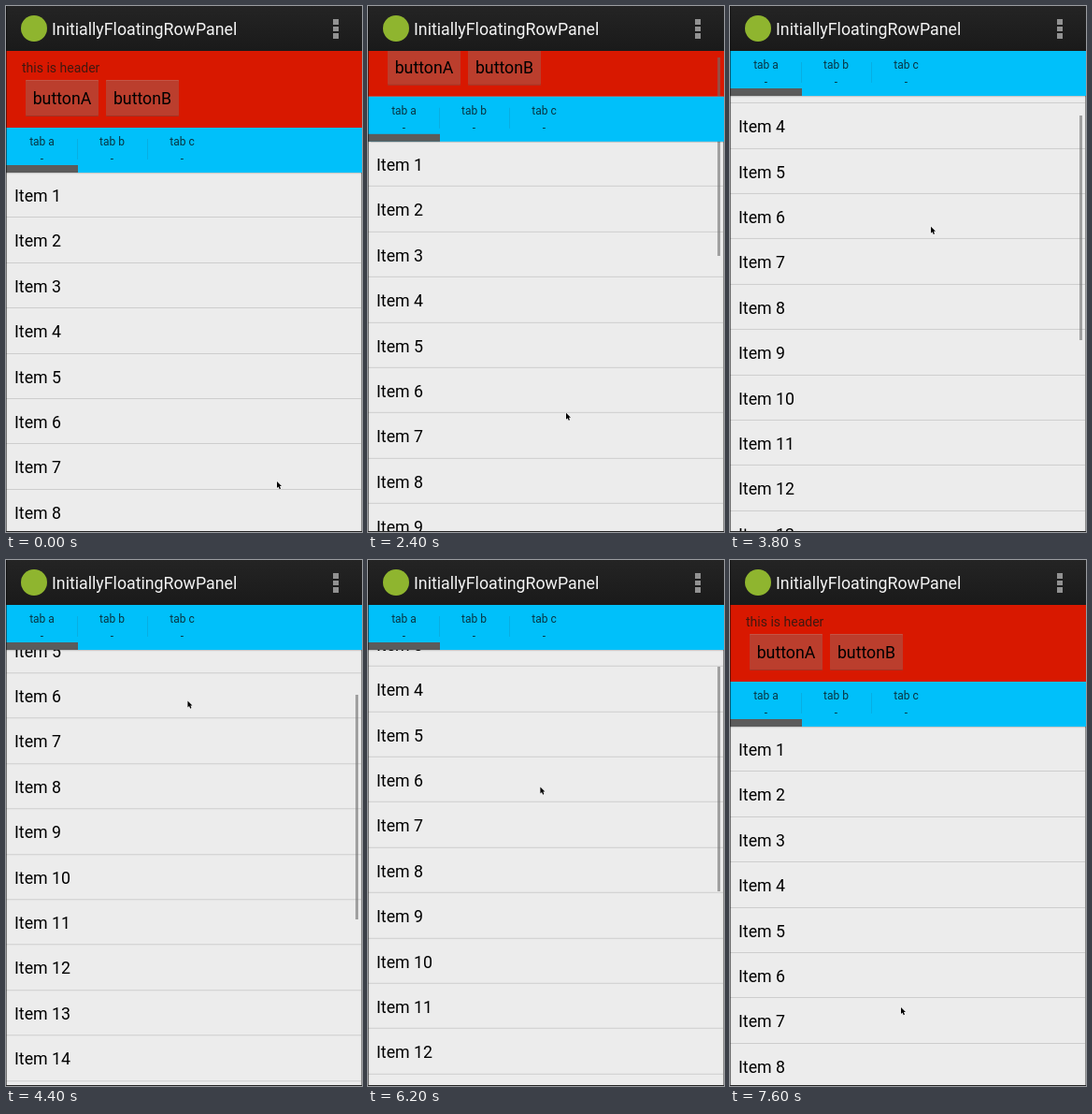
Recreate the animation shown at these times as an HTML page. Size 381x562 px, loop 7.8 s.

```html
<!DOCTYPE html>
<html lang="en">
<head>
<meta charset="utf-8">
<title>Sticky list</title>
<style>
html, body { margin: 0; width: 100%; height: 100%; overflow: hidden; }
#stage {
  position: relative; width: 381px; height: 562px; overflow: hidden;
  background: #ececec; color: #000; font: 17.75px Roboto, sans-serif;
}
#stage div, #stage svg { position: absolute; white-space: nowrap; }
#list { left: 0; top: 178px; width: 381px; }
.item {
  left: 0; width: 381px; height: 48.4px; line-height: 50px;
  text-indent: 9px; box-sizing: border-box; border-bottom: 1px solid #cdcdcd;
}
#right { left: 380px; top: 48px; width: 1px; height: 514px; background: #8c8c8c; }
#header { left: 0; top: 48px; width: 381px; height: 82px; background: #d81800; }
#note { left: 17px; top: 8px; font-size: 14px; line-height: 20px; color: #42180f; }
.button {
  top: 31px; width: 78px; height: 38.5px; line-height: 40px; text-align: center;
  background: #bb3e2d; border-radius: 1px;
  box-shadow: inset 0 1px #c65445, inset 0 -1px #a23323;
}
#thumb { left: 373.5px; width: 3.5px; background: rgba(110, 110, 110, .6); }
#tabs {
  left: 0; top: 130px; width: 381px; height: 48px; background: #00c0fa;
  box-shadow: 0 1px 1px rgba(0, 0, 0, .15);
}
.tab {
  top: 6px; width: 75px; height: 36px; font-size: 12px; line-height: 18px;
  text-align: center; color: #083442; white-space: pre !important;
}
.rule { top: 12px; width: 1px; height: 22px; background: #08aee2; }
#mark { left: 0; bottom: .5px; width: 77px; height: 8px; background: #5b5b5b; }
#bar { left: 0; top: 0; width: 381px; height: 48px; background: linear-gradient(#242424, #1a1a1a); }
#logo { left: 16px; top: 10px; width: 28px; height: 28px; border-radius: 50%; background: #8fb52f; }
#name { left: 49px; top: 0; line-height: 50px; color: #f4f4f4; }
.dot { left: 350px; width: 5.5px; height: 5.5px; background: #929292; }
#left { left: 0; top: 0; width: 1px; height: 562px; background: rgba(0, 0, 0, .5); }
#base { left: 0; top: 560.5px; width: 381px; height: 1.5px; background: #242424; }
#cursor { left: 0; top: 0; overflow: visible; }
</style>
</head>
<body>
<div id="stage">
  <div id="list"></div>
  <div id="right"></div>
  <div id="header">
    <div id="note">this is header</div>
    <div class="button" style="left:21px">buttonA</div>
    <div class="button" style="left:107px">buttonB</div>
  </div>
  <div id="thumb"></div>
  <div id="tabs"><div id="mark"></div></div>
  <div id="bar">
    <div id="logo"></div>
    <div id="name">InitiallyFloatingRowPanel</div>
  </div>
  <div id="left"></div>
  <div id="base"></div>
  <svg id="cursor" width="7" height="10">
    <path d="M0 0V7L1.6 5.6L2.8 8.2L4 7.6L2.9 5.1H5Z" stroke="#fff" stroke-width=".5" paint-order="stroke"/>
  </svg>
</div>
<script>
const LOOP = 7800, STEP = 200, ROW = 48.4, TAB = 75;
const HEADER = 82, REACH = 316;
const $ = id => document.getElementById(id);

function add(parent, cls, text, style) {
  const el = document.createElement("div");
  el.className = cls;
  el.textContent = text;
  Object.assign(el.style, style);
  $(parent).append(el);
}

for (let i = 0; i < 18; i++) add("list", "item", "Item " + (i + 1), { top: i * ROW + "px" });
for (let i = 0; i < 3; i++) {
  add("bar", "dot", "", { top: 14 + i * 7.5 + "px" });
  add("tabs", "tab", `tab ${"abc"[i]}\n-`, { left: 1 + i * TAB + "px" });
  if (i) add("tabs", "rule", "", { left: 1 + i * TAB + "px" });
}

const move = (id, x, y) => { $(id).style.transform = `translate(${x}px, ${y}px)`; };

function draw(time) {
  const t = Math.floor(time % LOOP / STEP) * STEP;
  // Progress from 0 to 1 between two times
  const ramp = (from, to) => Math.min(1, Math.max(0, (t - from) / (to - from)));

  const scroll = REACH * (ramp(2150, 4530) - ramp(5800, 6984));
  move("list", 0, -scroll);
  move("header", 0, -scroll);
  move("tabs", 0, -Math.min(scroll, HEADER));

  // The pointer approaches, drags up, rests, then drags back down
  const approach = ramp(1000, 1800);
  const x = 290 - 78 * approach + 3 * ramp(2400, 3800) - 25 * ramp(3800, 4530)
    - 14 * ramp(5800, 6800) + 7 * ramp(6800, 7400);
  const y = 508 - 35 * approach - 341 * ramp(2130, 4530) + 346 * ramp(5800, 7053);
  move("cursor", x, y);

  Object.assign($("thumb").style, {
    top: 44 + scroll / 3 + "px",
    height: Math.min(240, 204 + scroll / 4) + "px",
    opacity: ramp(2200, 2400) - ramp(5000, 5400) + ramp(5800, 6000) - ramp(7200, 7600)
  });
}

const start = performance.now();
function tick() {
  draw(performance.now() - start);
  requestAnimationFrame(tick);
}
tick();
</script>
</body>
</html>
```
